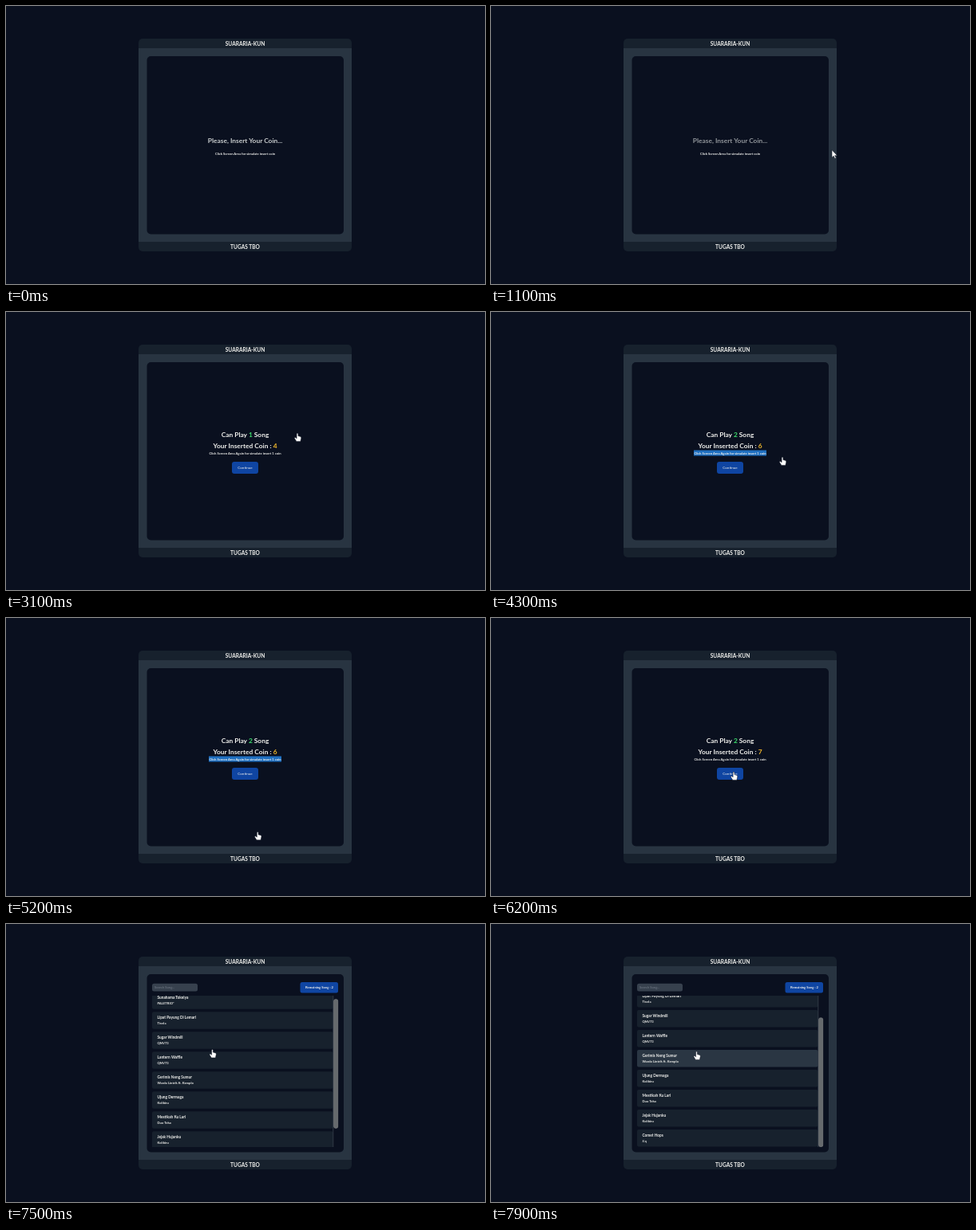
Write an HTML page that moves like this. It is 600 px wide and 349 px high and loops after 8 s.

```html
<!DOCTYPE html>
<html lang="en">
<head>
<meta charset="utf-8">
<title>Karaoke machine</title>
<style>
  html, body { margin: 0; width: 100%; height: 100%; overflow: hidden; background: #0a101f; }
  svg { display: block; }
  #stage { width: 100vw; height: 100vh; }
  text { font: bold 8.4px Lato, sans-serif; fill: #f1f1ee; }
  .mid { text-anchor: middle; }
  .title { font-size: 6.6px; }
  .hint { font-size: 4.15px; }
  .song { font-size: 4.75px; }
  .button { font-size: 4.6px; font-weight: normal; }
  .search { font-weight: normal; fill: #737c88; }
  .green { fill: #3ddc6d; }
  .amber { fill: #f2b92c; }
</style>
</head>
<body>
<svg id="stage" viewBox="0 0 600 349">
  <rect x="166" y="41" width="267" height="267" rx="5" fill="#17212d"/>
  <rect x="166" y="53" width="267" height="243" fill="#283441"/>
  <rect x="176.5" y="63" width="246.5" height="223.5" rx="5" fill="#0a101f"/>
  <text class="mid title" x="299.5" y="50">SUARARIA-KUN</text>
  <text class="mid title" x="299.5" y="305">TUGAS TBO</text>
  <g id="screen"></g>
  <g id="cursor" fill="#fff" stroke="#0a101f" stroke-width=".5" stroke-linejoin="round">
    <path id="hand" d="M-.9 .8Q0-.6 .9 .8V3.6L4 4.4Q5 4.8 4.8 6.2L3.9 10.4H-1.2L-3.6 6.6Q-3.7 5.2-2.4 5.5L-.9 6.8Z"/>
    <path id="arrow" d="M0 0V9.4L2.2 7.4 3.7 10.7 5.2 10 3.7 6.9H6.6Z"/>
  </g>
</svg>
<script>
const LOOP = 8000, STEP = 100, CENTER = 299.5;
const COIN_TIMES = [1400, 1800, 2300, 2800, 3700, 4100, 5700];
const COINS_PER_SONG = 3;
const SONGS = [
  ["Sunahama Tokeiya", "PALETRIO*"],
  ["Lipat Payung Di Lemari", "Tivela"],
  ["Sugar Windmill", "QNV73"],
  ["Lantern Waffle", "QNV73"],
  ["Gerimis Neng Sumur", "Wardo Lintrik ft. Kemplo"],
  ["Ujung Dermaga", "Kolibiru"],
  ["Mestikah Ku Lari", "Duo Teko"],
  ["Jejak Hujanku", "Kolibiru"],
  ["Comet Hops", "λ'q"]
];
const LIST = { x: 183, y: 90, width: 233.5, height: 190, row: 25, rowHeight: 21.6, scroll: 32 };
// time, x and y of the pointer tip
const PATH = [
  [900, 490, 183], [1200, 405, 180], [1400, 372, 175], [1700, 366.5, 172.5],
  [2800, 366.5, 172.5], [3100, 365, 152], [3500, 364, 182], [4100, 364, 182],
  [4300, 365, 182], [4700, 361, 187], [5000, 330, 195], [5300, 310, 294],
  [5700, 308, 165], [5900, 307, 170], [6200, 304, 193], [6900, 304, 193],
  [7100, 297.5, 190], [7500, 258.5, 157.5], [7700, 257.5, 160]
];
const $ = id => document.getElementById(id);
const ease = p => { p = Math.min(1, Math.max(0, p)); return p * p * (3 - 2 * p); };

const text = (x, y, body, style = "", extra = "") =>
  `<text x="${x}" y="${y}" class="${style}" ${extra}>${body}</text>`;
const box = (x, y, width, height, fill, rx = 0, extra = "") =>
  `<rect x="${x}" y="${y}" width="${width}" height="${height}" rx="${rx}" fill="${fill}" ${extra}/>`;

function pointerAt(t) {
  const next = PATH.findIndex(key => key[0] > t);
  if (next === 0) return null;
  if (next < 0) return PATH[PATH.length - 1].slice(1);
  const [t0, x0, y0] = PATH[next - 1], [t1, x1, y1] = PATH[next];
  const p = ease((t - t0) / (t1 - t0));
  return [x0 + (x1 - x0) * p, y0 + (y1 - y0) * p];
}

function welcome(t) {
  const opacity = 0.85 + 0.15 * Math.cos(t / 1000 * Math.PI);
  return text(CENTER, 171.7, "Please, Insert Your Coin...", "mid", `style="fill:#c9cdce" opacity="${opacity}"`) +
    text(CENTER, 186.5, "Click Screen Area for simulate insert coin", "mid hint");
}

function coinScreen(t, coins) {
  const songs = Math.floor(coins / COINS_PER_SONG), y = songs ? 0 : 8;
  const selected = t >= 4100 && t < 5300;
  return text(CENTER, 157.3 + y, `Can Play <tspan class="green">${songs}</tspan> Song`, "mid") +
    text(CENTER, 170.5 + y, `Your Inserted Coin : <tspan class="amber">${coins}</tspan>`, "mid") +
    (selected ? box(254, 173.5, 91, 7, "#1f6fc0") : "") +
    text(CENTER, 178.5 + y, "Click Screen Area Again for simulate insert 1 coin", "mid hint") +
    (songs ? box(283, 188, 33, 15, "#0f45a2", 3) + text(CENTER, 197, "Continue", "mid button") : "");
}

function songList(t, [, tipY]) {
  const scroll = LIST.scroll * ease((t - 7435) / 265);
  const canHover = t < 7500 || t > 7700;
  const rows = SONGS.map(([song, artist], i) => {
    const y = i * LIST.row - scroll, tip = tipY - LIST.y - y;
    const hovered = canHover && tip >= 0 && tip <= LIST.rowHeight;
    return box(0, y, 226.5, LIST.rowHeight, hovered ? "#2a3643" : "#17212d", 2) +
      text(6.5, y + 9.2, song, "song") + text(6.5, y + 16.2, artist, "hint");
  }).join("");
  const ratio = LIST.height / (LIST.height + LIST.scroll);
  return box(183, 74.8, 57, 9.7, "#37414e", 2.5) + text(186, 81.2, "Search Song...", "hint search") +
    box(368.5, 73, 47.5, 13.5, "#0f45a2", 2.5) + text(392.5, 81.2, "Remaining Song : 2", "mid hint") +
    `<svg x="${LIST.x}" y="${LIST.y}" width="${LIST.width}" height="${LIST.height}">${rows}` +
    box(226.5, 0, 0.7, LIST.height, "#414c58") +
    box(227.5, scroll * ratio + 0.3, 5.4, LIST.height * ratio - 0.6, "#666a6d", 2.5, 'stroke="#85888a" stroke-width=".5"') +
    "</svg>";
}

function render(t) {
  const coins = COIN_TIMES.filter(time => time <= t).length;
  const tip = pointerAt(t);
  $("screen").innerHTML = t >= 6400 ? songList(t, tip) : coins ? coinScreen(t, coins) : welcome(t);
  $("cursor").style.display = tip ? "" : "none";
  if (!tip) return;
  const [x, y] = tip, inside = x > 176 && x < 423 && y > 63 && y < 286;
  $("cursor").setAttribute("transform", `translate(${x} ${y})`);
  $("hand").style.display = inside ? "" : "none";
  $("arrow").style.display = inside ? "none" : "";
}

let shown = -1;
const start = performance.now();
function tick() {
  const t = Math.floor((performance.now() - start) % LOOP / STEP) * STEP;
  if (t !== shown) render(shown = t);
  requestAnimationFrame(tick);
}
tick();
</script>
</body>
</html>
```
